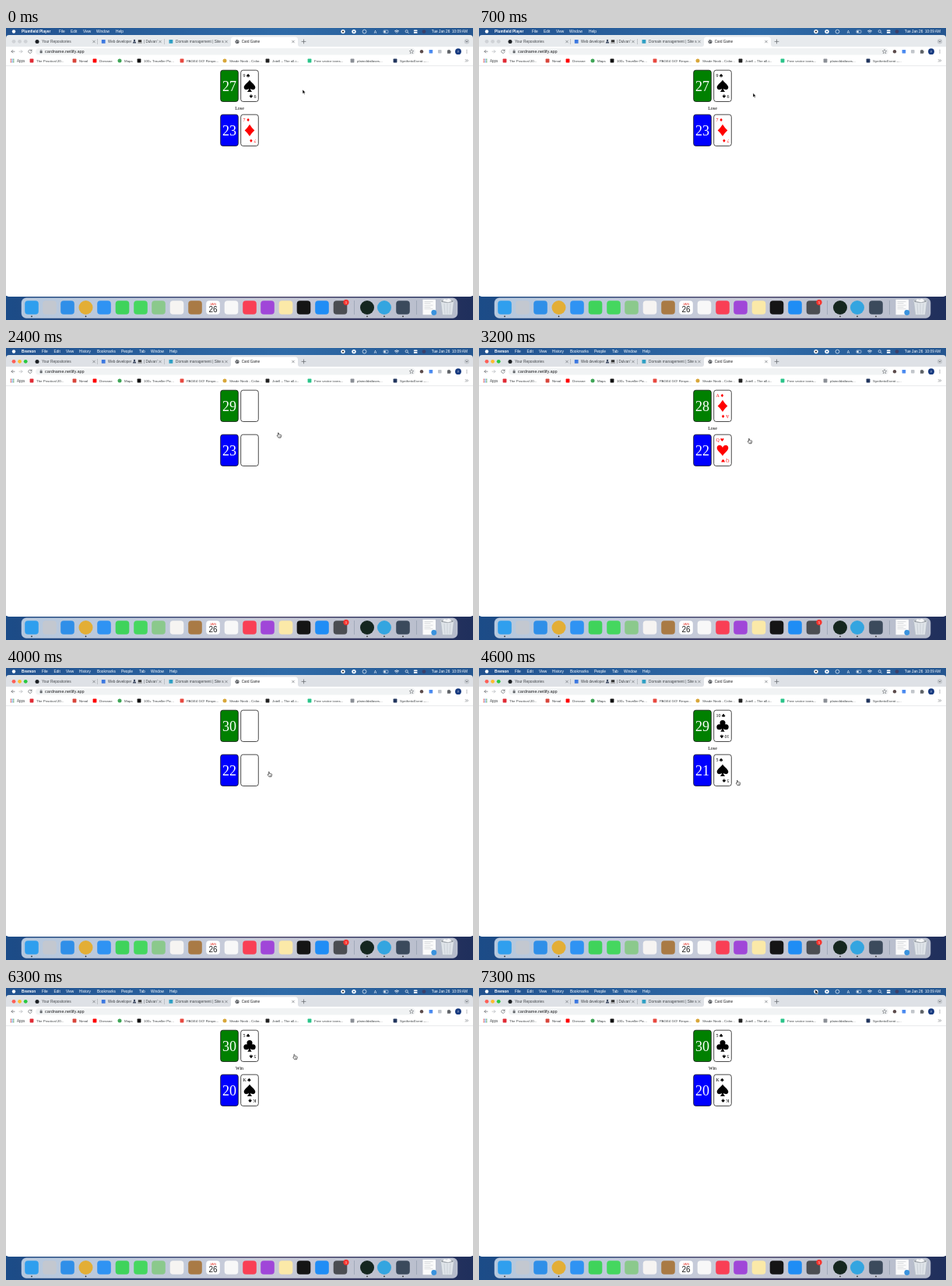
An HTML page that plays this animation: 600 px wide and 375 px high, repeating every 7400 ms.

```html
<!DOCTYPE html>
<html lang="en">
<head>
<meta charset="utf-8">
<title>Card Game</title>
<style>
html, body { margin: 0; width: 100%; height: 100%; overflow: hidden; background: #fff; }
svg { display: block; width: 100vw; height: 100vh; }
text { font-family: "Liberation Sans", Arial, sans-serif; white-space: pre; }
.serif { font-family: "Liberation Serif", Times, serif; }
</style>
</head>
<body>
<svg viewBox="0 0 600 375">
  <defs>
    <linearGradient id="sky">
      <stop offset="0" stop-color="#22528f"/><stop offset=".6" stop-color="#2f6ba8"/><stop offset="1" stop-color="#24558f"/>
    </linearGradient>
    <linearGradient id="ground">
      <stop offset="0" stop-color="#1b4c88"/><stop offset=".55" stop-color="#4a4268"/><stop offset="1" stop-color="#1f2f5c"/>
    </linearGradient>
    <linearGradient id="shelf">
      <stop offset="0" stop-color="#b5c8de"/><stop offset=".55" stop-color="#c9cbd8"/><stop offset="1" stop-color="#b6bccb"/>
    </linearGradient>
  </defs>
  <g id="back"></g>
  <g id="top"></g>
  <g id="game"></g>
  <g id="cursor"></g>
</svg>
<script>
const LOOP = 7400, STEP = 100;
const $ = id => document.getElementById(id);
const text = (x, y, s, size, fill, more = '') =>
  `<text x="${x}" y="${y}" font-size="${size}" fill="${fill}" ${more}>${s}</text>`;
const rect = (x, y, w, h, fill, r = 0, more = '') =>
  `<rect x="${x}" y="${y}" width="${w}" height="${h}" rx="${r}" fill="${fill}" ${more}/>`;
const dot = (x, y, r, fill, more = '') => `<circle cx="${x}" cy="${y}" r="${r}" fill="${fill}" ${more}/>`;
const line = (d, color, w = .7) =>
  `<path d="${d}" fill="none" stroke="${color}" stroke-width="${w}" stroke-linecap="round"/>`;
const cross = x => line(`M${x - 1.4} 16.1l2.8 2.8m0-2.8l-2.8 2.8`, '#5f6368', .6);
const centered = 'text-anchor="middle"';

function statusIcons() {
  return dot(433, 4.6, 2.7, '#fff') + dot(433, 4.6, 1.1, '#222')
    + dot(447, 4.6, 2.7, '#fff') + rect(446.1, 3.7, 1.8, 1.8, '#2f6ba8')
    + dot(460.5, 4.6, 2.4, 'none', 'stroke="#dce6f2" stroke-width=".8"')
    + text(474.5, 6.5, 'A', 5.2, '#fff', centered)
    + rect(485, 3, 6, 3.4, 'none', .8, 'stroke="#fff" stroke-width=".5"') + rect(485.6, 3.6, 2, 2.2, '#fff')
    + line('M499.4 3.8q2.6-2.2 5.2 0m-4.2 1.2q1.6-1.3 3.2 0m-1.6 1.3v0', '#fff', .8)
    + dot(514.7, 4.2, 1.6, 'none', 'stroke="#fff" stroke-width=".6"') + line('M516 5.5l1.3 1.3', '#fff')
    + rect(523.8, 2.5, 4.8, 1.8, '#fff', .9) + rect(523.8, 5, 4.8, 1.8, '#fff', .9)
    + dot(537, 4.6, 2.4, '#3b3f68')
    + text(593, 6.4, 'Tue Jan 26  10:09 AM', 4.75, '#fff', 'text-anchor="end"');
}

function toolbar() {
  const grey = '#5f6368';
  return rect(0, 24, 600, 24, '#fff')
    + line('M11 30.2H7m1.8-1.8l-1.8 1.8 1.8 1.8', grey)
    + line('M17 30.2h4m-1.8-1.8l1.8 1.8-1.8 1.8', '#b4b8bc')
    + line('M32.9 29a2.2 2.2 0 1 0 .2 1.9M33 27.8v1.5h-1.5', grey)
    + rect(38, 25.9, 488, 8.6, '#f1f3f4', 4.3)
    + rect(43.6, 29.6, 3, 2.6, grey, .4) + line('M44.2 29.6v-.7a.9.9 0 0 1 1.8 0v.7', grey, .5)
    + text(50, 32, 'cardname.netlify.app', 5.5, '#202124')
    + `<path d="M521 27.4l.8 1.9 2 .1-1.6 1.3.6 2-1.8-1.1-1.8 1.1.6-2-1.6-1.3 2-.1z" fill="none" stroke="${grey}" stroke-width=".5"/>`
    + dot(534, 30.2, 2.2, '#5b4b4b') + rect(543.6, 28, 4.6, 4.6, '#4a8af0', .6)
    + rect(555, 28, 4.6, 4.4, '#c2c6cb', 1)
    + `<path d="M567 28.6h1.2a.8.8 0 0 1 1.6 0h1.3v1.3a.8.8 0 0 1 0 1.6v1.2h-4.1z" fill="${grey}"/>`
    + dot(581, 30.2, 3.9, '#173a80') + text(581, 31.5, 'Y', 3.6, '#fff', centered)
    + [28.4, 30.2, 32].map(y => dot(592, y, .5, grey)).join('');
}

// [icon x, icon colour, label, round icon]
const bookmarks = [
  [33, '#e02b35', 'The Practical 20...'], [88, '#d9453a', 'Nimal'], [114, '#f00', 'Dorvane'],
  [146, '#3fa657', 'Maps', 1], [171, '#111', '100+ Traveller Pic...'], [226, '#e8483f', 'PAGE4 GO! Respo...'],
  [281, '#d8a63a', 'Shade Nook - Color...', 1], [336, '#222', 'Jotell – The all-i...'],
  [390, '#2bc48a', 'Free vector icons...'], [445, '#8b8f96', 'plainoldatlases...'], [500, '#22365e', 'SyntheticEvent –...']
];

function bookmarkBar() {
  let s = text(14, 43.7, 'Apps', 4.5, '#3c4043');
  for (let i = 0; i < 9; i++)
    s += rect(5.6 + i % 3 * 1.8, 39.6 + Math.floor(i / 3) * 1.8, 1.2, 1.2, ['#e0483e', '#4a86e8', '#46a35a'][i % 3]);
  for (const [x, color, label, round] of bookmarks)
    s += (round ? dot(x, 42, 2.5, color) : rect(x - 2.4, 39.6, 4.8, 4.8, color, .6))
      + text(x + 6, 43.7, label, 4.4, '#3c4043');
  return s + line('M590.3 40.5l1.4 1.4-1.4 1.4m2-2.8l1.4 1.4-1.4 1.4', '#5f6368', .6)
    + rect(0, 48, 600, .6, '#dadce0');
}

// [centre x, colour, round icon]
const apps = [
  [33, '#2f9fee'], [56, '#c3c8d0'], [79, '#2f8fe8'], [102.5, '#e3ae35', 1], [126, '#2f93f3'], [149.5, '#3fd35b'],
  [173, '#45d75f'], [196, '#8bc98c'], [219.5, '#f6f4f2'], [243, '#a97a45'], [266, '#fff'], [289.5, '#f8f8f8'],
  [313, '#f93f55'], [336, '#a046d8'], [359.5, '#fbe9a8'], [382.5, '#151515'], [406, '#1f8df5'], [429.5, '#4b4d52'],
  [464, '#15261f', 1], [486, '#34a5e0', 1], [510, '#3b4a5c']
];

function dock() {
  let s = rect(0, 344, 600, 31, 'url(#ground)')
    + rect(20, 346.8, 560, 25.6, 'url(#shelf)', 6, 'stroke="#dde4ec" stroke-width=".4"');
  for (const [x, color, round] of apps)
    s += round ? dot(x, 359, 9, color) : rect(x - 8.8, 350.2, 17.6, 17.6, color, 4);
  s += text(266, 355.8, 'JAN', 4.4, '#e5352c', centered) + text(266, 365.4, '26', 10, '#222', centered)
    + dot(437, 352.3, 3.6, '#f5352f') + text(437, 353.9, '1', 4.4, '#fff', centered);
  for (const x of [33, 102.5, 464, 486, 510]) s += dot(x, 370.4, .8, '#222');
  for (const x of [447, 527]) s += rect(x, 350, .6, 18, '#8e9aab');
  s += rect(535.5, 348.8, 16.5, 19.5, '#fbfbfb', .5);
  for (let i = 0; i < 5; i++) s += rect(537.5, 351 + i * 2.4, i % 2 ? 8 : 11, .5, '#b6bac0');
  s += dot(549.8, 365.5, 3.4, '#3a92dd');
  return s + '<path d="M558.5 350.5h17l-2.2 18h-12.6z" fill="#dfe4e9" stroke="#a9b2bc" stroke-width=".5"/>'
    + '<ellipse cx="567" cy="350.8" rx="8.5" ry="2.4" fill="#8f979f" stroke="#eef1f4" stroke-width=".7"/>'
    + '<path d="M561 351l2-3 3 1.2 3-1.8 2.5 2 1.5 1.6-5 1.2z" fill="#f5f6f7"/>'
    + line('M563 354l1 13m3-13v13m4-13l-1 13', '#b4bcc5', .5);
}

const idleMenu = [[20, 'Plumfield Player'], [68, 'File'], [83, 'Edit'], [99, 'View'], [116, 'Window'], [141, 'Help']];
const liveMenu = [[20, 'Bremon'], [46, 'File'], [61.5, 'Edit'], [77, 'View'], [94, 'History'], [117, 'Bookmarks'],
  [148, 'People'], [171, 'Tab'], [186, 'Window'], [210, 'Help']];

// Menu bar and tab strip, both of which depend on the window having focus
function windowTop(live) {
  const strip = live ? '#dee1e6' : '#e7eaed', ink = '#45494d';
  let s = (live ? liveMenu : idleMenu).map(([x, label], i) =>
    text(x, 6.4, label, 4.8, '#fff', i ? '' : 'font-weight="bold"')).join('');
  s += `<path d="M0 24V13q0-4 4-4H596q4 0 4 4V24z" fill="${strip}"/>`
    + '<path d="M286 24q3 0 3-3v-6q0-3.5 3.5-3.5h79q3.5 0 3.5 3.5v6q0 3 3 3z" fill="#fff"/>';
  ['#fe5f57', '#febc2e', '#28c840'].forEach((c, i) => s += dot(10 + i * 7.6, 17.3, 2.4, live ? c : '#cfd2d6'));
  return s + dot(40, 17.4, 2.5, '#1b1f23') + text(46, 19.1, 'Your Repositories', 4.8, ink) + cross(113)
    + rect(122.8, 15, 4.8, 4.8, '#3c78e0', .5) + text(131, 19.1, 'Web developer', 4.5, ink)
    + dot(165, 16, 1.2, '#3d4a63') + `<path d="M162.8 19.6q0-2.4 2.2-2.4t2.2 2.4z" fill="#3d4a63"/>`
    + rect(169.8, 15.3, 4.4, 3, '#333') + rect(169.2, 18.7, 5.6, .8, '#777')
    + text(177, 19.1, "| Dulvan'", 4.6, ink) + cross(198)
    + rect(209.5, 15, 4.8, 4.8, '#2f9fc4', .5) + text(218, 19.1, 'Domain management | Site s', 4.8, ink) + cross(283)
    + dot(297, 17.4, 2.5, '#4d5156') + line('M295.2 16.4l1.5.8-.6 1.4m2-3l-.5 1 1.2.9', '#fff', .6)
    + text(302.8, 19.1, 'Card Game', 4.5, '#202124') + cross(369)
    + line('M380 17.4h5m-2.5-2.5v5', '#5f6368')
    + rect(117.4, 14, .5, 7, '#9aa0a6') + rect(203.2, 14, .5, 7, '#9aa0a6')
    + dot(592, 17.3, 3.2, '#c8ccd1') + line('M590.8 16.8l1.2 1.2 1.2-1.2', '#45494d', .6);
}

const ball = (x, y) => `M${x - .46} ${y}a.46.46 0 1 0 .92 0a.46.46 0 1 0-.92 0z`;
const suits = {
  S: 'M0-1C.3-.55.95-.2.95.25C.95.7.4.75.12.45Q.15.8.4 1H-.4Q-.15.8-.12.45C-.4.75-.95.7-.95.25C-.95-.2-.3-.55 0-1Z',
  H: 'M0 .95C-.25.5-.95.1-.95-.4C-.95-1-.2-1.05 0-.45C.2-1.05.95-1 .95-.4C.95.1.25.5 0 .95Z',
  D: 'M0-1Q.35-.4.82 0Q.35.4 0 1Q-.35.4-.82 0Q-.35-.4 0-1Z',
  C: ball(0, -.5) + ball(-.54, .18) + ball(.54, .18) + 'M-.15-.2V.45H-.12Q-.15.8-.35.95H.35Q.15.8.12.45H.15V-.2Z'
};

function card(y, face) {
  const mid = y + 20.2;
  const s = rect(301.7, y, 22.6, 40.3, '#fff', 3, 'stroke="#000" stroke-width=".7"');
  if (!face) return s;
  const suit = face.slice(-1), rank = face.slice(0, -1);
  const color = 'HD'.includes(suit) ? '#f00' : '#000';
  const width = rank == '10' ? 6 : /\d/.test(rank) ? 3 : 4.3;
  const pip = (x, y, k) =>
    `<path transform="translate(${x} ${y}) scale(${k})" d="${suits[suit]}" fill="${color}"/>`;
  const corner = text(304.5, y + 8.9, rank, 6, color, 'class="serif"') + pip(308.1 + width, y + 6.8, 2.2);
  return s + corner + `<g transform="rotate(180 313 ${mid})">${corner}</g>` + pip(313, mid, 7.7);
}

const deck = (y, color, n) => rect(275.7, y, 22.6, 40.3, color, 3, 'stroke="#000" stroke-width=".7"')
  + text(287, y + 26.4, n, 18, '#fff', `class="serif" ${centered}`);

// [start, top deck, bottom deck, top card, bottom card, message]
const rounds = [
  [0, 27, 23, '9S', '7D', 'Lose'], [2000, 29, 23],
  [2600, 28, 22, 'AD', 'QH', 'Lose'], [3700, 30, 22],
  [4200, 29, 21, '10C', '5S', 'Lose'], [5100, 31, 21],
  [5600, 30, 20, '5C', 'KS', 'Win']
];
const board = ([, high, low, highCard, lowCard, note = '']) =>
  deck(54.2, 'green', high) + card(54.2, highCard)
  + text(300, 104.9, note, 6, '#000', `class="serif" ${centered}`)
  + deck(111.2, 'blue', low) + card(111.2, lowCard);

const path = [[0, 381, 79], [700, 352, 83.5], [1600, 354, 104.5], [3200, 348, 119.5],
  [4600, 333, 147.5], [6300, 371.5, 88.5], [7300, 432, 2]];
function pointer(t) {
  const i = Math.max(1, path.findIndex(p => p[0] >= t));
  const [t0, x0, y0] = path[i - 1], [t1, x1, y1] = path[i];
  const u = (t - t0) / (t1 - t0), e = u * u * (3 - 2 * u);
  return [x0 + (x1 - x0) * e, y0 + (y1 - y0) * e];
}
const arrow = '<path d="M0 0V5.4L1.3 4.3 2.2 6.2 3.1 5.8 2.3 3.9H3.9Z" fill="#000" stroke="#fff" stroke-width=".5"/>';
const hand = '<path d="M-1.6-3q.6-.6 1.1.2V-1L2.3-.5Q3-.2 2.8.7L2 3.2H-1L-2.8.6Q-2.8-.3-1.6.4Z" fill="#fff" stroke="#111" stroke-width=".6"/>'
  + line('M.2.9v1.3m1.1-1.3v1.3', '#111', .35);

$('back').innerHTML = rect(0, 0, 600, 14, 'url(#sky)') + dot(10, 4.5, 2.2, '#fff') + statusIcons()
  + dock() + '<path d="M0 48H600V341q0 4-4 4H4q-4 0-4-4z" fill="#fff"/>' + toolbar() + bookmarkBar();

const FOCUS = 1100;
const shown = {};
function show(id, key, make) {
  if (shown[id] !== key) { shown[id] = key; $(id).innerHTML = make(); }
}
function frame(now) {
  const t = Math.floor(now % LOOP / STEP) * STEP;
  const live = t >= FOCUS, round = rounds.findLast(r => t >= r[0]);
  const [x, y] = pointer(t);
  show('top', live, () => windowTop(live));
  show('game', round, () => board(round));
  const pointing = live && y > 48;
  show('cursor', pointing, () => pointing ? hand : arrow);
  $('cursor').setAttribute('transform', `translate(${x} ${y})`);
  requestAnimationFrame(frame);
}
frame(performance.now());
</script>
</body>
</html>
```
